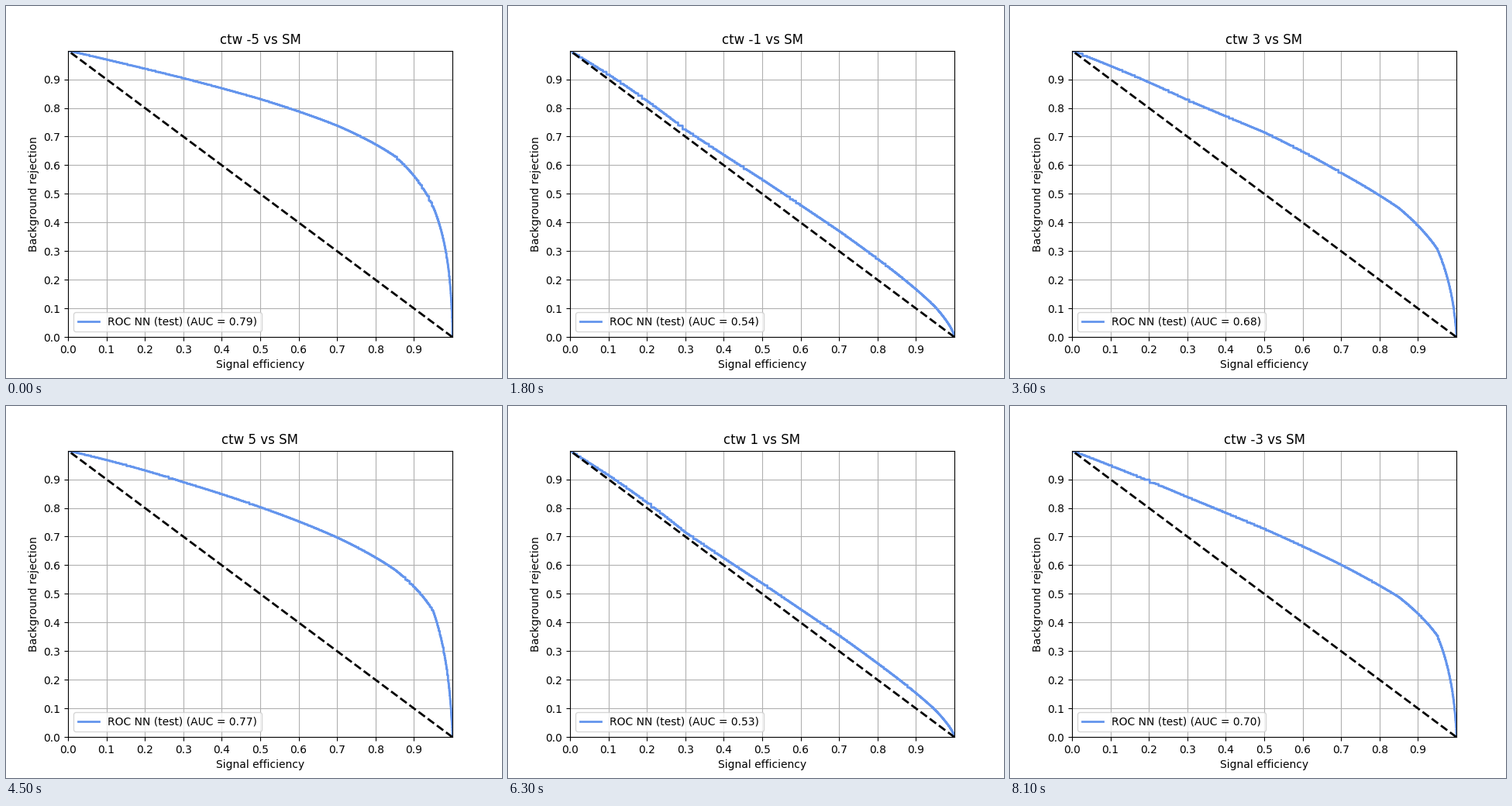
A matplotlib script that plays this animation: 640 px wide and 480 px high, repeating every 9 s.

```python
import numpy as np
import matplotlib.pyplot as plt
from matplotlib.animation import FuncAnimation

plt.rcParams["text.kerning_factor"] = 6

SEQUENCE = [-5, -3, -1, 1, 3, 5, 3, 1, -1, -3]
AUC = {-5: 0.79, -3: 0.70, -1: 0.54, 1: 0.53, 3: 0.68, 5: 0.77}

# Rejection is (1 - x) ** power, where the power drifts slowly with efficiency x.
KEY_X = np.array([0.1, 0.3, 0.5, 0.7, 0.85, 0.95, 0.998])
POWER = {
    -5: [0.299, 0.283, 0.267, 0.252, 0.242, 0.263, 0.365],
    -3: [0.507, 0.495, 0.460, 0.422, 0.377, 0.346, 0.464],
    1: [0.850, 0.940, 0.897, 0.860, 0.830, 0.786, 0.736],
    3: [0.520, 0.530, 0.484, 0.462, 0.420, 0.393, 0.510],
    5: [0.315, 0.327, 0.317, 0.300, 0.283, 0.274, 0.447],
}
POWER[-1] = 0.92 * np.array(POWER[1]) + 0.08 * np.array(POWER[-3])


def roc(ctw, events=600):
    """Points of a ROC staircase, denser towards the steep end."""
    rng = np.random.default_rng(ctw + 10)
    t = np.sort(rng.random(events))
    x = 1 - (1 - t) ** 2
    power = np.interp(-np.log(1 - x), -np.log(1 - KEY_X), POWER[ctw])
    y = (1 - x) ** power
    return np.r_[0, x, 1], np.r_[1, y, 0]


CURVES = {ctw: roc(ctw) for ctw in AUC}

fig, ax = plt.subplots(figsize=(6.4, 4.8), dpi=100)
curve, = ax.plot([], [], color="cornflowerblue", lw=2, drawstyle="steps-mid",
                 label="ROC NN (test) (AUC = 0.79)")
ax.plot([1, 0], [0, 1], "k--", lw=2)
ticks = np.arange(0, 1, 0.1)
ax.set(xlim=(0, 1), ylim=(0, 1), xticks=ticks, yticks=ticks,
       xlabel="Signal efficiency", ylabel="Background rejection")
ax.grid(True)
title = ax.set_title("")
label = ax.legend(loc="lower left").get_texts()[0]


def update(frame):
    ctw = SEQUENCE[frame % len(SEQUENCE)]
    curve.set_data(*CURVES[ctw])
    title.set_text(f"ctw {ctw} vs SM")
    label.set_text(f"ROC NN (test) (AUC = {AUC[ctw]:.2f})")
    return curve, title, label


anim = FuncAnimation(fig, update, frames=len(SEQUENCE), interval=900, repeat=True)
plt.show()
```
